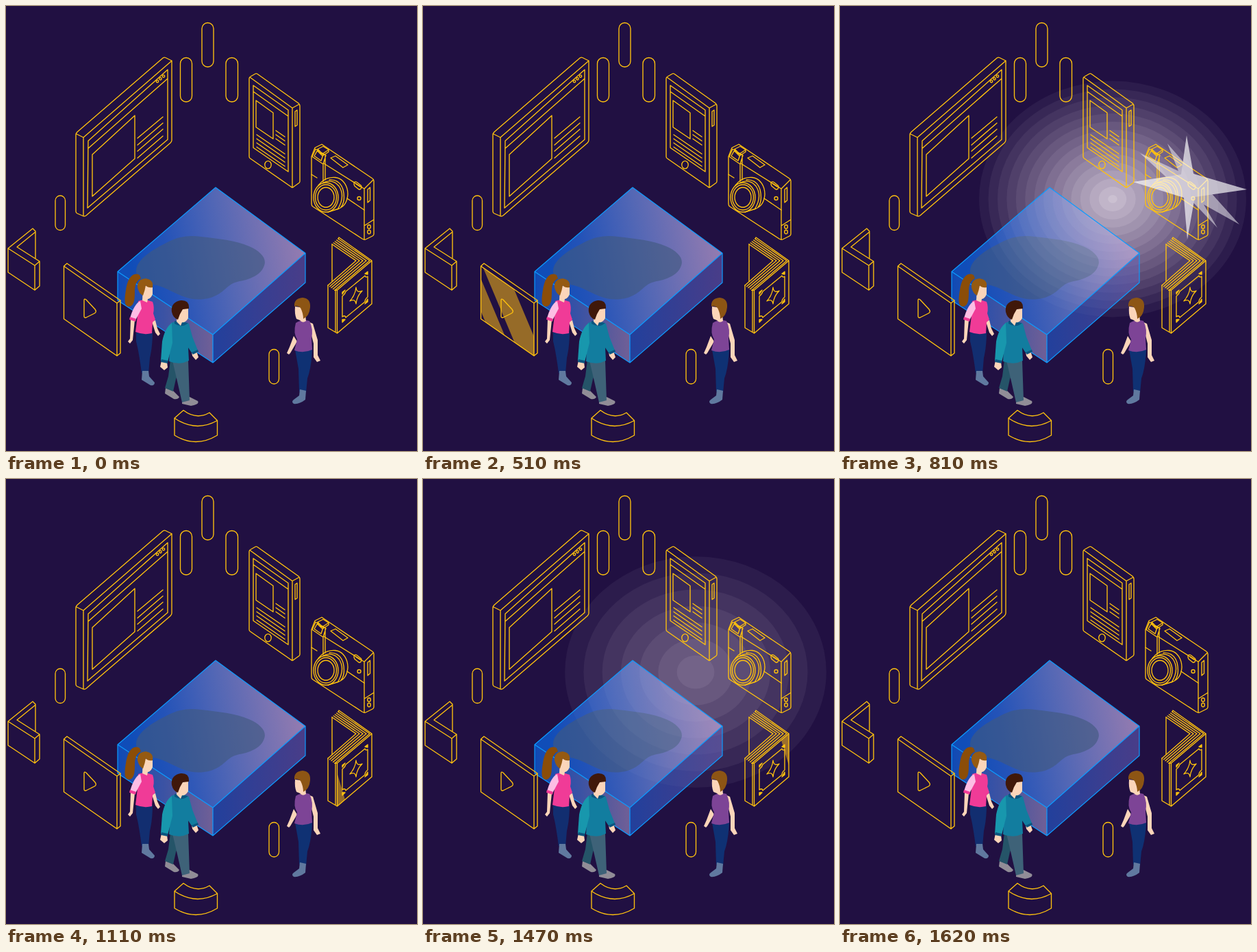
These frames come from a looping animation (600x650 px, 1.83 s). An HTML page:

```html
<!DOCTYPE html>
<html lang="en">
<head>
<meta charset="utf-8">
<title>Isometric media</title>
<style>
  html, body { margin: 0; width: 100%; height: 100%; overflow: hidden; background: #211042; }
  svg { display: block; width: 600px; height: 650px; }
  .line { fill: none; stroke: #ffc20e; stroke-width: 1.35; stroke-linejoin: round; stroke-linecap: round; }
  .edge { fill: none; stroke: #0c9cff; stroke-width: 1.2; stroke-linejoin: round; }
  .sheen { fill: #ffbc12; fill-opacity: .53; }
  .skin { fill: #fbd5b9; }
</style>
</head>
<body>
<svg viewBox="0 0 600 650">
  <defs>
    <linearGradient id="top" gradientUnits="userSpaceOnUse" x1="185" y1="390" x2="430" y2="345">
      <stop offset="0" stop-color="#104db8"/>
      <stop offset=".22" stop-color="#2453b8"/>
      <stop offset=".55" stop-color="#5367b5"/>
      <stop offset="1" stop-color="#937bb0"/>
    </linearGradient>
    <linearGradient id="left">
      <stop offset="0" stop-color="#0f4ab5"/>
      <stop offset=".5" stop-color="#3d53a3"/>
      <stop offset="1" stop-color="#705f96"/>
    </linearGradient>
    <linearGradient id="right">
      <stop offset="0" stop-color="#22409c"/>
      <stop offset="1" stop-color="#493d88"/>
    </linearGradient>
    <clipPath id="boxClip"><path d="M306 265L437 361V404L302 521L163 430V388Z"/></clipPath>
    <clipPath id="videoClip"><path d="M84.500 380L162 434V511L84.500 457Z"/></clipPath>
    <clipPath id="bookClip"><path d="M483.500 415L534 372V435L483.500 478Z"/></clipPath>
  </defs>

  <g id="glow" fill="#f6eff6"></g>

  <!-- platform -->
  <path fill="url(#top)" d="M306 265L437 361L302 480L163 388Z"/>
  <path fill="url(#left)" d="M163 388L302 480V521L163 430Z"/>
  <path fill="url(#right)" d="M302 480L437 361V404L302 521Z"/>
  <path fill="#41597f" fill-opacity=".62" d="M190 386C191 370 214 356 232 347C250 337 266 334 285 337C310 340 335 342 355 351C371 358 381 368 377 379C373 392 358 399 341 402C325 405 322 414 310 421C295 430 275 431 258 424C240 417 235 412 220 408C201 405 189 398 190 386Z"/>
  <g clip-path="url(#boxClip)"><use href="#glow" opacity=".58"/></g>
  <path class="edge" d="M306 265L437 361V404L302 521L163 430V388ZM163 388L302 480L437 361M302 480V521"/>

  <g clip-path="url(#videoClip)"><path id="videoSheen" class="sheen"/></g>
  <g clip-path="url(#bookClip)"><path id="bookSheen" class="sheen"/></g>

  <g class="line">
    <g id="pills"></g>

    <!-- monitor -->
    <path d="M102 188Q102 186 104 184L229 76Q231 74.500 233 75.500L242 80V196Q242 198 240 200L117 306Q114 308 112 306.500L104 303Q102 302 102 300ZM103 187L113 192L242 80M113 192V306"/>
    <path d="M120 197L236 93V195L119 295ZM120 208L236 106M126 217L188 160V223L126 278Z"/>
    <path d="M192 193L229 162M192 203L229 171M192 212L229 180M192 222L229 190"/>
    <circle cx="221" cy="110" r="1.700"/><circle cx="225.500" cy="106.300" r="1.700"/><circle cx="230" cy="102.600" r="1.700"/>

    <!-- phone -->
    <path d="M355 106Q355 104 357 103L364 99Q366 98 368 100L427 142Q429 144 429 146V256Q429 258 427 259L420 264Q418 266 416 264L357 223Q355 222 355 220ZM356 104L418 149L428 143.500M418 149V264"/>
    <path d="M361 116L412 152V242L361 207ZM361 125L412 161M365 138L390 156V194L365 177Z"/>
    <path d="M394 182L407 191M394 188L407 197M394 194L407 203M366 188L407 216M366 194L407 222M366 200L407 228M366 206L407 234"/>
    <path d="M422 154L425 152V174L422 176Z"/>
    <ellipse cx="382.500" cy="232" rx="4.700" ry="5.600"/>

    <!-- camera -->
    <path d="M446 220L451 207L461 202L535 252Q537 253 537 256V333Q537 335 535 336L525 341Q523 342 520 340L448 293Q446 292 446 289ZM464 230L523 267L536 254M523 267V341M523 321L537 312"/>
    <path d="M447 220L452 209L467 218L463 231ZM450 219L454 212L463 217L460 226ZM455 209L463 205L471 210L462 216ZM455 209V212L462 219L471 213V210M463 231V256M466 219V254"/>
    <path d="M474 222L481 219L499 232L492 236ZM446 246L454 251M498 281L523 298M528 268L531.500 265V284L528 287Z"/>
    <path d="M509 257Q511 256 513 258L518 262Q520 264 518 267Q516 269 514 267L509 263Q507 259 509 257ZM511 260L517 264"/>
    <circle cx="515.500" cy="281" r="2.500"/><ellipse cx="530" cy="322.500" rx="2.300" ry="2.800"/><ellipse cx="530" cy="330" rx="2.300" ry="2.800"/>
    <ellipse cx="467" cy="279.500" rx="18" ry="21.500"/><ellipse cx="467" cy="279.500" rx="15.500" ry="18.500"/><ellipse cx="467" cy="279.500" rx="12" ry="14.500"/>
    <path d="M456 262Q466 249 481 250.500C493 252 499 264 499 275Q498 291 486 296L470 301M463 258Q477 252 486 263Q496 278 484 297M472 254Q487 253 492 268Q496 285 489 294"/>

    <!-- book -->
    <g id="pages"></g>
    <path d="M476 348V402M485 340L486 338L534 372V435L483.500 478L470 470V408M480 415L483.500 415L534 372M483.500 415V478M481 415V476"/>
    <path d="M496 417L524 394Q525 397 528 395V425Q524 428 524 432L496 455Q495 451 491 454V424Q495 421 496 417Z"/>
    <path d="M511 411Q512 420 520 416Q512 424 511 435Q510 427 502 431Q510 422 511 411Z"/>
    <path fill="#ffc20e" d="M491 418L495 415L491 421ZM524 391L528 388V392ZM528 428V432L524 435ZM491 458V462L495 458Z"/>

    <!-- bracket -->
    <path d="M3 354L39 325L43 329V368M3 354V389L42 415V379ZM42 379L49 373V409L42 415M49 373L16 352L43 330"/>

    <!-- video card -->
    <path d="M84.500 380L89 376L167 430V507L162 511L84.500 457ZM84.500 380L162 434L167 430M162 434V511"/>
    <path d="M114 430Q114 427 117 429L130 443Q133 447 129 449L117 455Q114 456 114 453Z"/>

    <!-- arc -->
    <path d="M246 602L259 590.500Q278 605 297 594L308.500 605.500Q277 623 246 602V627Q277 646 308.500 627V605.500"/>
  </g>

  <!-- woman in pink -->
  <path fill="#8b4d08" d="M195 393C184 387 177 400 175 415C173 427 172 438 179 439C188 439 188 426 188 416C188 406 191 401 197 398Z"/>
  <path class="skin" d="M182 457L188 459L186 478L185 488L181 493L178 490L181 486ZM213 461L218 459L221 471L225 479L222 482L218 477Z"/>
  <path fill="#122e70" d="M190 475L214 476Q214 497 210 514L208 537L198 536Q194 505 190 490Z"/>
  <path fill="#60799f" d="M199 533L208 533L209 541L217 550Q217 555 211 554L198 546Z"/>
  <path fill="#f03b97" d="M193 431Q202 427 214 432Q217 440 215 449L218 458L214 462L213 478Q201 481 189 476L192 452Z"/>
  <path fill="#fdbde4" d="M196 431Q187 435 181 456L189 459L198 442Z"/>
  <path fill="#f03b97" d="M181 454L190 457L189 461L180 458Z"/>
  <path class="skin" d="M200 410L214 406L214 421Q211 428 207 428L206 433L199 430Z"/>
  <path fill="#955a12" d="M192 411Q191 399 204 398Q216 400 214 411Q207 412 204 408Q203 415 200 423Q194 420 192 411Z"/>

  <!-- man -->
  <path class="skin" d="M227 518L235 520L236 528L231 532L225 527ZM271 505L278 504L281 513L277 517L272 511Z"/>
  <path fill="#918d97" d="M233 558L244 562L253 571Q251 575 245 574L232 566ZM257 573L268 571L280 577Q283 582 270 584L257 581Z"/>
  <path fill="#255468" d="M240 517L258 520L248 545L244 563L232 558L237 541Z"/>
  <path fill="#3e6278" d="M243 518L266 518Q267 545 268 576L257 579L250 548Z"/>
  <path fill="#127d9f" d="M241 463Q253 457 267 464L272 483L280 503L272 508L266 499L267 518Q253 525 238 519Z"/>
  <path fill="#1897ad" d="M242 463Q232 470 228 490L226 518L236 520L243 492Z"/>
  <path fill="#0b5580" d="M246 460L266 463Q257 471 246 464ZM227 516L236 518L236 522L226 520ZM271 506L280 502L281 505L273 509Z"/>
  <path class="skin" d="M250 446L266 440L266 456Q262 463 257 462L255 467L249 461Z"/>
  <path fill="#40180a" d="M242 447Q240 433 255 430Q268 429 267 442L258 443L254 450L251 458Q244 456 242 447Z"/>

  <!-- woman in purple -->
  <path class="skin" d="M420 482L425 490L415 507L413 509L410 507L414 498ZM441 461L448 464L455 488L455 510L459 518L454 520L449 513L449 493Z"/>
  <path fill="#0f3173" d="M422 502L447 500Q446 528 440 544L438 565L428 563L427 530Z"/>
  <path fill="#60799f" d="M429 560L438 562L437 575Q428 582 420 581Q416 578 420 575L428 569Z"/>
  <path fill="#7d4496" d="M423 463Q432 457 443 460Q449 472 446 486L447 502Q434 508 421 503L425 487Q419 478 423 463Z"/>
  <path class="skin" d="M422 439L436 441L438 460Q433 464 429 459L424 457Q421 450 422 439Z"/>
  <path fill="#8d5514" d="M421 439Q420 427 433 426Q445 427 444 440Q443 453 434 457Q434 449 430 441Q426 437 421 439Z"/>

  <g id="star" fill="#fff">
    <path d="M-5 -76L5 -20L83 3L7 14L-4 76L-9 15L-83 -8L-13 -19Z"/>
    <path fill-opacity=".75" d="M-33 -64L10 -15L72 54L20 25L40 59L-3 14L-73 -50L-17 -24Z"/>
  </g>
</svg>
<script>
  const LOOP = 1830, STEP = 30, REPEAT = 780;
  const GLOW = { x: 398, y: 282, rx: 199, ry: 176, band: .052, rings: 15 };
  const NS = 'http://www.w3.org/2000/svg';
  const $ = id => document.getElementById(id);

  function add(parent, tag, attrs) {
    const el = document.createElementNS(NS, tag);
    for (const k in attrs) el.setAttribute(k, attrs[k]);
    return parent.appendChild(el);
  }

  // Linear interpolation through [time, value] keys.
  function track(keys, t) {
    if (t <= keys[0][0]) return keys[0][1];
    for (let i = 1; i < keys.length; i++) {
      const [t0, v0] = keys[i - 1], [t1, v1] = keys[i];
      if (t <= t1) return v0 + (v1 - v0) * (t - t0) / (t1 - t0);
    }
    return keys[keys.length - 1][1];
  }

  for (const [x, y, width, height] of [
    [286, 24.5, 17, 64.5], [254.5, 75.5, 17, 64.5], [321, 75.5, 17.5, 64.5],
    [72, 277, 14.5, 50.5], [384, 501.5, 14.5, 50.5]
  ]) add($('pills'), 'rect', { x, y, width, height, rx: width / 2 });

  for (let i = 0; i < 5; i++) {
    add($('pages'), 'path', {
      d: `M${476 + 2.2 * i} ${348 - 2 * i}L${511 + 5 * i} 372L${470 + 2.5 * i} ${408 + 1.8 * i}`
    });
  }

  const rings = Array.from({ length: GLOW.rings }, (_, i) => add($('glow'), 'ellipse', {
    cx: GLOW.x, cy: GLOW.y, 'fill-opacity': GLOW.band / (1 - GLOW.band * i)
  }));

  const glowKeys = [[630, 0], [660, .2], [690, .38], [720, .53], [810, .77]];
  const starKeys = [[690, 0], [720, .1], [750, .27], [780, .5], [810, 1]];
  const fadeKeys = [[720, 1], [810, .66]];
  const videoKeys = [[240, 74], [510, 144], [720, 228]];
  const bookKeys = [[990, 466], [1110, 482], [1470, 576], [1500, 592]];

  // Two slanted bands trailing behind the leading edge x.
  function sheen(el, x, y, slope, widths) {
    const h = 100, d = slope * h;
    const [front, gap, back] = widths;
    const band = (a, b) =>
      `M${a - d} ${y - h}L${b - d} ${y - h}L${b + d} ${y + h}L${a + d} ${y + h}Z`;
    const mid = x - front - gap;
    el.setAttribute('d', band(x - front, x) + band(mid - back, mid));
  }

  function draw(t) {
    const u = t < 840 ? t : t - REPEAT;
    const lit = u < 840;
    const peak = lit ? track(glowKeys, u) : 0;
    rings.forEach((ring, i) => {
      const size = peak ? Math.max(0, 1 - (i + .3) * GLOW.band / peak) : 0;
      ring.setAttribute('rx', GLOW.rx * size);
      ring.setAttribute('ry', GLOW.ry * size);
    });

    const scale = lit ? track(starKeys, u) : 0;
    $('star').setAttribute('transform', `translate(511 265) scale(${scale})`);
    $('star').setAttribute('opacity', scale ? track(fadeKeys, u) : 0);

    sheen($('videoSheen'), track(videoKeys, t), 440, .42, [32, 10, 20]);
    sheen($('bookSheen'), track(bookKeys, t), 425, .3, [21, 6, 13]);
  }

  const start = performance.now();
  function tick() {
    const t = (performance.now() - start) % LOOP;
    draw(Math.floor(t / STEP) * STEP);
    requestAnimationFrame(tick);
  }
  tick();
</script>
</body>
</html>
```
